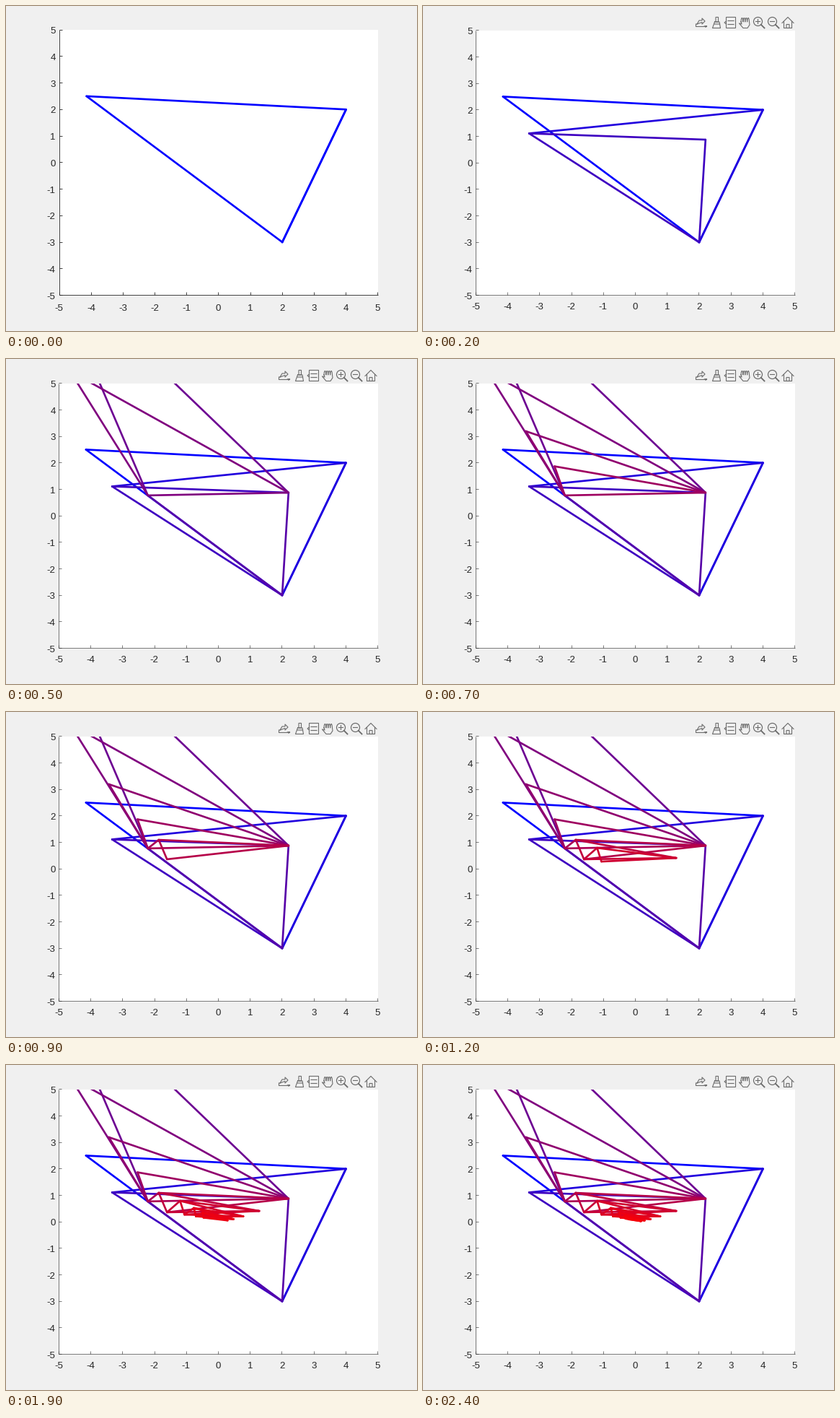
A matplotlib script for the animation above (2500 ms loop, 570x450 px).

```python
from itertools import combinations, cycle, islice

import numpy as np
import matplotlib.pyplot as plt
from matplotlib.animation import ArtistAnimation
from matplotlib.lines import Line2D
from matplotlib.patches import Circle, Rectangle

W, H, DPI = 570, 450, 100
PX = 72 / DPI
RIGHT, BOTTOM = 515.7, 400.5
INK, ICON = "#262626", "#6b6b6b"

plt.rcParams["font.family"] = "Liberation Sans"
fig = plt.figure(figsize=(W / DPI, H / DPI), dpi=DPI, facecolor="#f0f0f0")
ax = fig.add_axes([0, 0, 1, 1])
ax.set(xlim=(0, W), ylim=(H, 0))
ax.axis("off")


def line(pts, color=INK, width=0.75, z=50, **style):
    xs, ys = zip(*pts)
    return ax.add_line(Line2D(xs, ys, color=color, lw=width * PX, zorder=z,
                              solid_joinstyle="round", **style))


class View:
    """Plot area from -5 to 5 both ways, with rulers on the left and below."""

    def __init__(self, left, top, label_y, weight):
        self.left, self.top = left, top
        self.area = ax.add_patch(Rectangle(
            (74, round(top)), 442, 401 - round(top), fc="white", lw=0, zorder=1))
        x0, y0 = int(left), int(BOTTOM)

        def ruler(*pts):
            return line(pts, width=weight, solid_capstyle="butt")

        self.parts = [self.area, ruler((x0, round(top)), (x0, y0), (516, y0))]
        for v in range(-5, 6):
            x, y = self.to_px((v, v))
            self.parts += [ruler((x - 0.5, y0), (x - 0.5, y0 - 4)),
                           ruler((x0, y - 0.5), (x0 + 4, y - 0.5)),
                           self.label(x - 0.4, label_y, v, "center"),
                           self.label(68.7, y + 5.2, v, "right")]

    def to_px(self, p):
        return (self.left + (p[0] + 5) * (RIGHT - self.left) / 10,
                BOTTOM - (p[1] + 5) * (BOTTOM - self.top) / 10)

    def label(self, x, y, value, align):
        return ax.text(x, y, str(value), color=INK, fontsize=13.3 * PX,
                       ha=align, va="baseline", zorder=60)

    def edges(self, corners, step):
        """Edges of one simplex, keyed by their end points."""
        blue = 0.87 ** step
        drawn = {}
        for ends in combinations(corners, 2):
            edge = line(map(self.to_px, ends), (1 - blue, 0, blue), 2.67,
                        2 + step, solid_capstyle="round")
            edge.set_clip_path(self.area)
            drawn[frozenset(ends)] = edge
        return drawn


def toolbar():
    """Row of small outline icons above the plot."""
    parts = []

    def stroke(*pts, width=1.1):
        parts.append(line(pts, ICON, width, snap=False))

    def box(x, y, w, h):
        parts.append(ax.add_patch(Rectangle((x, y), w, h, fill=False, ec=ICON,
                                            lw=1.1 * PX, zorder=50, snap=False)))

    # export
    stroke((380, 25), (383, 20), (387, 20), (387, 17), (391, 21), (387, 25),
           (387, 22.5), (380, 25))
    stroke((378.5, 25), (378.5, 28.5), (390, 28.5))
    stroke((390.5, 28), (393.5, 28), (392, 29), width=1.5)
    # brush
    box(406, 15.5, 3.5, 6.5)
    stroke((404.5, 22), (411, 22), (412.5, 30.5), (401.5, 30.5), (404.5, 22))
    stroke((404, 25), (411.5, 25))
    # data tip
    box(420.5, 15.5, 13, 15)
    stroke((420.5, 21), (418, 23), (420.5, 25))
    for y in (20.5, 25.5):
        stroke((423, y), (431, y))
    # hand: four finger tips over a palm
    t = np.linspace(0, 1, 41)
    tips = zip(441 + 11.5 * t, 22 - 5.5 * np.sqrt(abs(np.sin(4 * np.pi * t))))
    stroke(*tips, (453, 26), (450, 30.5), (444, 30.5), (438.5, 24), (442, 25),
           (441, 22))
    # zoom in and out
    for x in (464.5, 484.5):
        parts.append(ax.add_patch(Circle((x, 21.5), 6, fill=False, ec=ICON,
                                         lw=1.2 * PX, zorder=50)))
        stroke((x - 3, 21.5), (x + 3, 21.5))
        stroke((x + 4.3, 25.8), (x + 9, 30.5), width=1.8)
    stroke((464.5, 18.5), (464.5, 24.5))
    # home
    stroke((498, 23.5), (506, 15.5), (514, 23.5))
    stroke((500.5, 21.5), (500.5, 30.5), (511.5, 30.5), (511.5, 21.5))
    box(504, 25.5, 4, 5)
    return parts


def shrink(point, rate):
    """Walk towards the minimum at the origin."""
    while True:
        yield point
        point = (point[0] * rate[0], point[1] * rate[1])


# Moves are (corner, new place): a few wide jumps, one corner falling in,
# then all three corners closing in by turns.
corners = [(-4.15, 2.5), (4, 2), (2, -3)]
moves = [(0, (-3.33, 1.11)), (1, (2.2, 0.875)), (0, (-2.21, 0.77)),
         (2, (-5.37, 9.64))]
moves += [(2, p) for p in islice(shrink((-4.65, 5.46), (0.738, 0.585)), 4)]
walks = [shrink((-1.61, 0.36), (0.66, 0.76)),
         shrink((1.28, 0.41), (0.61, 0.5)),
         shrink((-1.2, 0.79), (0.64, 0.66))]
moves += [(k, next(walks[k])) for k in islice(cycle(range(3)), 16)]

first = View(74.1, 33.0, 421.6, 0.85)
later = View(73.3, 33.75, 420.3, 0.6)
later.parts += toolbar()

frames = [first.parts + list(first.edges(corners, 0).values())]
shown = later.edges(corners, 0)
for step, (k, place) in enumerate(moves, 1):
    corners[k] = place
    shown = {**shown, **later.edges(corners, step)}
    frames.append(later.parts + list(shown.values()))

anim = ArtistAnimation(fig, frames, interval=100, repeat=True, repeat_delay=0)
plt.show()
```
